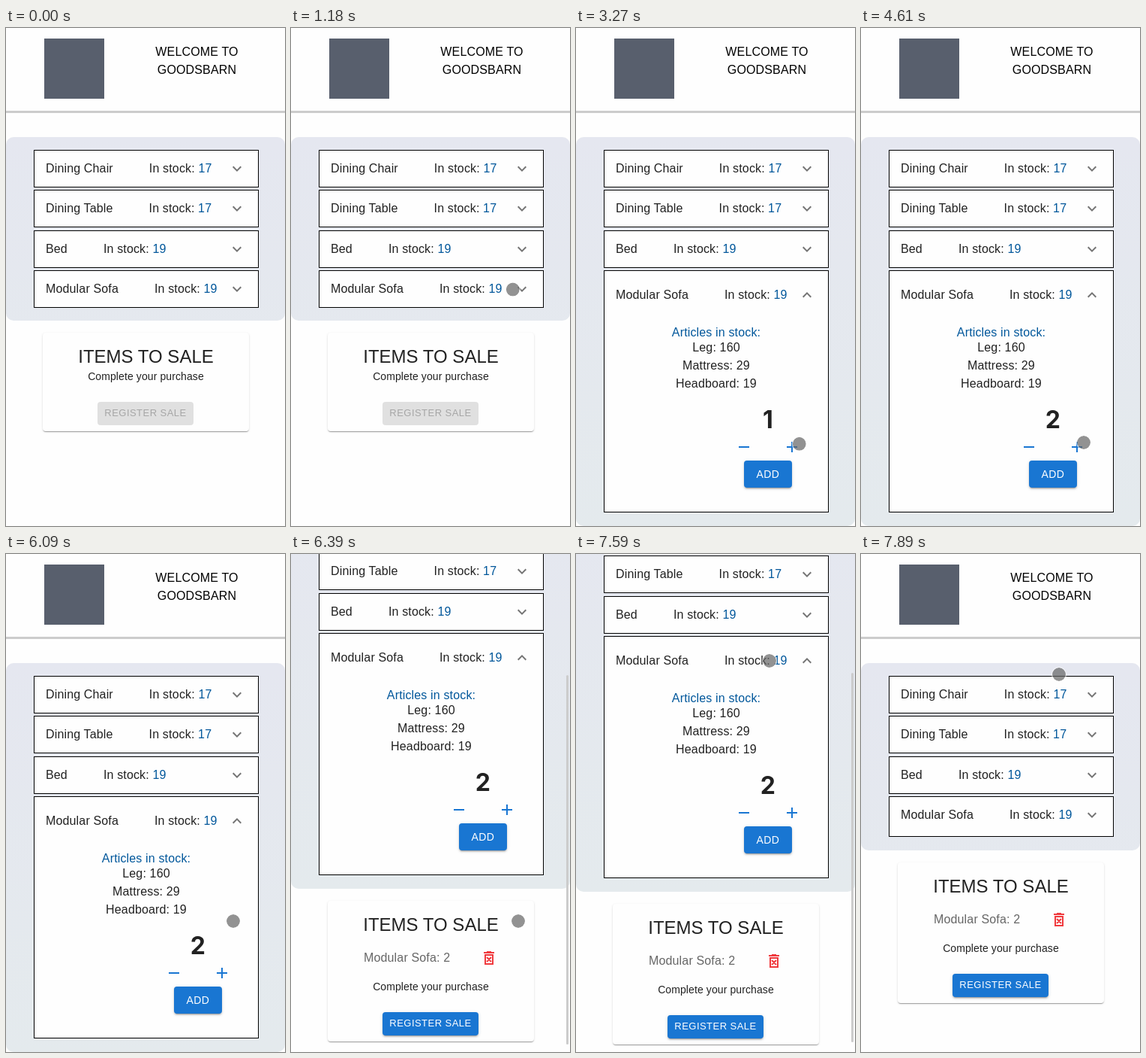
Animation, 372 px wide and 662 px high, one loop 8000 ms. Source, as an HTML page:

```html
<!DOCTYPE html>
<html lang="en">
<head>
<meta charset="utf-8">
<title>Stock app</title>
<style>
  html, body { margin: 0; width: 100%; height: 100%; overflow: hidden; background: #fefefe; }
  body { position: relative; font: 16px/24px "Liberation Sans", Arial, sans-serif; letter-spacing: .15px; color: #212121; }
  div, svg { position: absolute; box-sizing: border-box; white-space: nowrap; }
  #page { left: 0; top: 0; width: 372px; height: 662px; }
  #logo { left: 51px; top: 14px; width: 80px; height: 80px; background: #585f6d; }
  #welcome { left: 155px; width: 199px; top: 20px; text-align: center; color: #000; }
  #rule { left: 0; top: 110px; width: 372px; height: 3px; background: #ccc; }
  #panel { left: 0; top: 145px; width: 372px; border-radius: 10px;
    background: linear-gradient(#e5e7f0, #e4eaed) 0 0 / 100% 517px no-repeat; }
  .row { left: 37px; width: 300px; height: 50px; border: 1px solid #000; background: #fefefe; overflow: hidden; }
  .summary { left: 15px; top: 12px; }
  .summary span { margin-left: 48px; }
  b { font-weight: 400; color: #01579b; }
  svg { width: 24px; height: 24px; fill: none; stroke: #1976d2; stroke-width: 2; }
  .chevron { left: 258px; top: 12px; stroke: #757575; }
  .center { left: 0; width: 100%; text-align: center; }
  #details { left: 0; width: 298px; height: 256px; }
  #count { left: 186px; width: 64px; top: 118px; text-align: center; font: 700 32px/32px Inter, sans-serif; }
  .button { border-radius: 4px; text-align: center; background: #e0e0e0; color: #a6a6a6; }
  .button.on { background: #1976d2; color: #fff;
    box-shadow: 0 3px 1px -2px #0003, 0 2px 2px #00000024, 0 1px 5px #0000001f; }
  #add { left: 186px; top: 188px; width: 64px; height: 36px; font-size: 14px; line-height: 36px; letter-spacing: .4px; }
  #card { left: 49px; width: 275px; border-radius: 4px; background: #fefefe;
    box-shadow: 0 2px 1px -1px #0003, 0 1px 1px #00000024, 0 1px 3px #0000001f; }
  #title { top: 16px; font-size: 24px; line-height: 32px; letter-spacing: 0; }
  #item { left: 48px; top: 64px; color: #666; }
  #item svg { left: 155px; top: 0; stroke: #f03a3e; }
  #complete { font-size: 14px; letter-spacing: .1px; }
  #register { left: 73px; width: 128px; height: 31px; font-size: 13px; line-height: 30px; letter-spacing: .46px; }
  #thumb { left: 367px; width: 3px; height: 491px; border-radius: 2px; background: #ccc; }
  #cursor { left: -9.5px; top: -9.5px; width: 20px; height: 20px; border-radius: 50%;
    background: #646464b3; border: 1px solid #fffa; background-clip: padding-box; }
</style>
</head>
<body>
<div id="page">
  <div id="logo"></div>
  <div id="welcome">WELCOME TO<br>GOODSBARN</div>
  <div id="rule"></div>
  <div id="panel"></div>
  <div id="card">
    <div id="title" class="center">ITEMS TO SALE</div>
    <div id="item">Modular Sofa: 2
      <svg viewBox="0 0 24 24"><path d="M7 8h10v12H7zM5 5h14M9 4h6M9 11l6 6m0-6-6 6"/></svg>
    </div>
    <div id="complete" class="center">Complete your purchase</div>
    <div id="register" class="button">REGISTER SALE</div>
  </div>
</div>
<div id="thumb"></div>
<div id="cursor"></div>
<script>
const $ = id => document.getElementById(id);
const show = (id, visible) => $(id).style.visibility = visible ? 'visible' : 'hidden';
const page = $('page');

const products = { 'Dining Chair': 17, 'Dining Table': 17, 'Bed': 19, 'Modular Sofa': 19 };
Object.entries(products).forEach(([name, stock], i) => {
  const row = document.createElement('div');
  row.className = 'row';
  row.style.top = 162 + Math.round(i * 53.4) + 'px';
  row.innerHTML = `<div class="summary">${name}<span>In stock: <b>${stock}</b></span></div>
    <svg class="chevron" viewBox="0 0 24 24"><path d="M6.7 9.3 12 14.6l5.3-5.3"/></svg>`;
  page.append(row);
});
const sofa = page.lastElementChild;
const [summary, chevron] = sofa.children;
sofa.insertAdjacentHTML('beforeend', `<div id="details">
  <div class="center" style="top:6px"><b>Articles in stock:</b></div>
  <div class="center" style="top:26px">Leg: 160<br>Mattress: 29<br>Headboard: 19</div>
  <div id="count"></div>
  <svg viewBox="0 0 24 24" style="left:174px;top:158px"><path d="M5 12h14"/></svg>
  <svg viewBox="0 0 24 24" style="left:238px;top:158px"><path d="M5 12h14M12 5v14"/></svg>
  <div id="add" class="button">ADD</div></div>`);

// Times in ms; the picture advances in ticks.
const LOOP = 8000, START = 290, TICK = 148.8;
const OPEN = 1400, ONE = 2950, TWO = 3700, ADDED = 5050, SCROLL = 6093, CLOSE = 7628;

// Where the cursor rests: time, x, y
const stops = [
  [START, 351, 383], [590, 310, 357], [OPEN, 294, 346], [1927, 251, 496], [2530, 286, 550], [TWO, 298, 552],
  [4160, 313, 481], [4605, 296, 550], [ADDED, 258, 599], [5800, 302, 487], [6900, 302, 487],
  [7581, 257, 141], [7878, 263, 159]];

// cubic-bezier(.4, 0, .2, 1)
function ease(x) {
  if (x <= 0) return 0;
  if (x >= 1) return 1;
  let lo = 0, hi = 1, s;
  for (let i = 0; i < 24; i++) {
    s = (lo + hi) / 2;
    const u = 1 - s;
    if (1.2 * u * u * s + .6 * u * s * s + s ** 3 < x) lo = s; else hi = s;
  }
  return 3 * s * s - 2 * s ** 3;
}
const progress = (t, start, duration) => ease((t - start) / duration);
const opened = (t, duration) => progress(t, OPEN, duration) - progress(t, CLOSE, duration);

function cursorAt(t) {
  let [time, x, y] = stops[0];
  for (const [nextTime, nextX, nextY] of stops.slice(1)) {
    const p = progress(t, time, nextTime - time);
    x += (nextX - x) * p;
    y += (nextY - y) * p;
    time = nextTime;
  }
  return [x, y];
}

function draw(t) {
  const head = opened(t, 150), body = opened(t, 300);
  const panelBottom = Math.round(389.4 + 16 * head + 256.5 * body);
  const hasItem = t >= ADDED, shift = hasItem ? 56 : 0;

  sofa.style.height = Math.round(50 + 16 * head + 256 * body) + 'px';
  summary.style.top = chevron.style.top = 12 + 8 * head + 'px';
  chevron.style.transform = `rotate(${180 * head}deg)`;
  $('details').style.top = 48 + 16 * head + 'px';
  show('details', body > 0);
  $('count').textContent = (t >= ONE) + (t >= TWO);
  $('add').classList.toggle('on', t >= ONE);

  $('panel').style.height = panelBottom - 145 + 'px';
  $('card').style.top = panelBottom + 16 + 'px';
  $('card').style.height = 131 + shift + 'px';
  show('item', hasItem);
  $('complete').style.top = 46 + shift + 'px';
  $('register').style.top = 92 + shift + 'px';
  $('register').classList.toggle('on', hasItem);

  // The swipe overshoots the end of the page, then settles.
  const swipe = 217 * progress(t, SCROLL, 297) - 4 * progress(t, SCROLL + 298, 700);
  const limit = t > CLOSE ? Math.max(0, panelBottom + 213 - 662) : Infinity;
  const scroll = Math.round(Math.min(swipe, limit));
  page.style.top = -scroll + 'px';
  $('thumb').style.top = scroll * .742 + 'px';
  show('thumb', scroll > 0);

  const [x, y] = cursorAt(t);
  $('cursor').style.transform = `translate(${x}px, ${y}px)`;
  show('cursor', t >= START);
}

function frame() {
  const t = performance.now() % LOOP;
  const step = Math.floor((t - START + 5) / TICK);
  draw(step < 0 ? 0 : START + step * TICK);
  requestAnimationFrame(frame);
}
frame();
</script>
</body>
</html>
```
